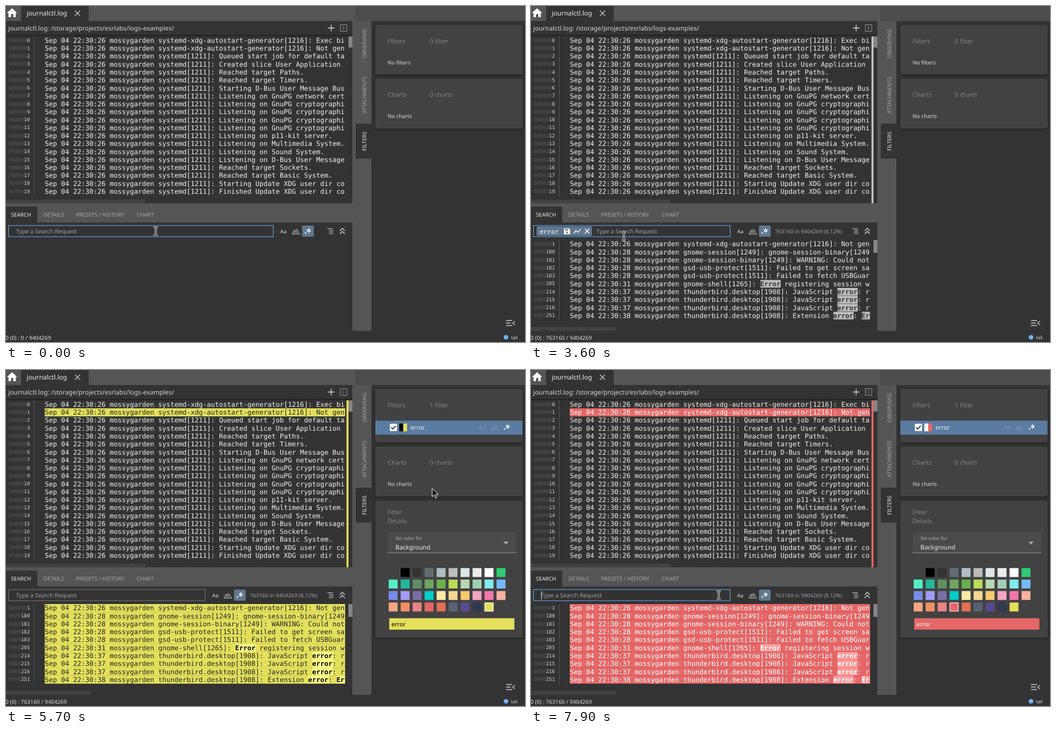
An HTML page for the animation above (8 s loop, 929 px wide and 603 px high).

```html
<!DOCTYPE html>
<html lang="en">
<head>
<meta charset="utf-8">
<title>Log search</title>
<style>
html, body { margin: 0; width: 100%; height: 100%; overflow: hidden; background: #333; }
svg { display: block; width: 929px; height: 603px; }
text { font-family: "Noto Sans", "Open Sans", sans-serif; white-space: pre; text-rendering: geometricPrecision; }
.mono { font-family: "DejaVu Sans Mono", monospace; }
.card { fill: #424242; filter: drop-shadow(0 1px 2px rgba(0, 0, 0, .45)); }
</style>
</head>
<body>
<svg viewBox="0 0 929 603"><g id="base"></g><g id="live"></g></svg>
<script>
const LOOP = 8000, STEP = 100;
const ROW = 14.27, CHAR = 7.26, LOG_X = 69.4, LOG_END = 607;
const GREY = '#555', BG = '#333', YELLOW = '#e4e05c', RED = '#e66767', STEEL = '#5f7890';

const rect = (x, y, w, h, fill, extra = '') =>
  `<rect x="${x}" y="${y}" width="${w}" height="${h}" fill="${fill}" ${extra}/>`;
const line = (d, color = '#ddd', width = 1.3) =>
  `<path d="${d}" fill="none" stroke="${color}" stroke-width="${width}"/>`;
const shape = (d, fill, extra = '') => `<path d="${d}" fill="${fill}" ${extra}/>`;
const text = (x, y, s, size, fill = '#ddd', extra = '') =>
  `<text x="${x}" y="${y}" font-size="${size}" fill="${fill}" ${extra}>${s}</text>`;
const mono = (x, y, s, size, fill) => text(x, y, s, size, fill, 'class="mono"');
const at = (x, y, s) => `<g transform="translate(${x} ${y})">${s}</g>`;

const HOST = 'mossygarden';
const mainLog = [
  'systemd-xdg-autostart-generator[1216]: Exec bi',
  'systemd-xdg-autostart-generator[1216]: Not gen',
  ...[
    'Queued start job for default ta', 'Created slice User Application ',
    'Reached target Paths.', 'Reached target Timers.',
    'Starting D-Bus User Message Bus', 'Listening on GnuPG network cert',
    'Listening on GnuPG cryptographi', 'Listening on GnuPG cryptographi',
    'Listening on GnuPG cryptographi', 'Listening on GnuPG cryptographi',
    'Listening on p11-kit server.', 'Listening on Multimedia System.',
    'Listening on Sound System.', 'Listening on D-Bus User Message',
    'Reached target Sockets.', 'Reached target Basic System.',
    'Starting Update XDG user dir co', 'Finished Update XDG user dir co'
  ].map(s => 'systemd[1211]: ' + s)
].map((s, i) => [i, 26, s]);

const jsError = 'thunderbird.desktop[1908]: JavaScript error: r';
const foundLog = [
  [1, 26, mainLog[1][2]],
  [180, 28, 'gnome-session[1249]: gnome-session-binary[1249'],
  [181, 28, 'gnome-session-binary[1249]: WARNING: Could not'],
  [182, 28, 'gsd-usb-protect[1511]: Failed to get screen sa'],
  [183, 28, 'gsd-usb-protect[1511]: Failed to fetch USBGuar'],
  [205, 31, 'gnome-shell[1265]: Error registering session w'],
  [214, 37, jsError], [215, 37, jsError], [216, 37, jsError],
  [251, 38, 'thunderbird.desktop[1908]: Extension error: Er']
];

const palette = `000 333 636e72 b2bec3 bdbdbd dfe6e9 ececec fff 2ecc71
 55efc4 22b898 5f8f63 6fa560 6ab04c badc58 b8d8b0 9fd0b5 81ecec 74b9ff
 778beb a29bfe 786fa6 00cec9 ffeaa7 f7d794 fdcb6e f8a5c2 f277a8 fab1a0
 f3a683 f19066 ea8685 e66767 e17055 596275 574b90 303952 e4e05c`.split(/\s+/);

// One log row: rank, optional row colour, matched words, text.
function logRow([rank, sec, msg], top, look, marked) {
  const n = String(rank);
  const full = `Sep 04 22:30:${sec} ${HOST} ${msg}`;
  let out = mono(5, top + 10, `<tspan fill="#575757">${'0'.repeat(7 - n.length)}</tspan>${n}`, 9, '#d4d4d4');
  if (look.row) out += rect(LOG_X, top, LOG_END - LOG_X, ROW + .2, look.row);
  let body = full;
  if (marked) {
    body = full.replace(/\berror|\bEr$/gi, (m, i) => {
      out += rect(LOG_X + i * CHAR, top + .3, m.length * CHAR, ROW - .6, look.mark);
      return `<tspan font-weight="700" fill="${look.markText}">${m}</tspan>`;
    });
  }
  return out + mono(LOG_X, top + 11.4, body, 12.06, look.row ? look.text : '#f2f2f2');
}

const PLAIN = { row: '', mark: '#bdbdbd', markText: '#333' };
const TINT = {
  [YELLOW]: { row: YELLOW, text: '#222', mark: '#fffd8a', markText: '#000' },
  [RED]: { row: RED, text: '#fff', mark: '#ff9a9a', markText: '#fff' }
};

const caseIcon = c => text(-6, 3.5, 'Aa', 9.3, c);
const wordIcon = c => text(-5.7, 3, 'ab', 9.3, c) + line('M-6.5 3V5.3H6.5V3', c, 1);
const regexIcon = c => rect(-5, 2.2, 2.3, 2.3, c) + line('M2-5V3M-1.5-3L5.5 1M5.5-3L-1.5 1', c, 1.4);

function drawBase() {
  let s = rect(0, 0, 929, 603, BG);
  s += rect(0, 0, 625, 27, GREY) + rect(625, 0, 304, 27, '#4d4d4d') + rect(27, 0, 121, 27, BG);
  s += shape('M1.5 12.5L11 4L20 12.5H17.5V20H13V14.5H9V20H4.5V12.5Z', '#fff');
  s += text(37, 17, 'journalctl.log', 11.7, '#eee') + line('M123.5 8.5L132.5 17.5M132.5 8.5L123.5 17.5', '#ccc');
  s += text(4, 43.5, 'journalctl.log: /storage/projects/esrlabs/logs-examples/', 11.42, '#d6d6d6');
  s += line('M576 39.5H588M582 33.5V45.5') + line('M598.5 33.5H610V45.5H598.5Z', '#999', 1) + line('M602.5 36.5L605.5 39.5L602.5 42.5', '#aaa', 1);
  s += rect(0, 52, 620, 2, '#222') + rect(50, 54, 1, 287, '#555');
  s += rect(613, 54.5, 7, 20, '#858585') + rect(0, 347.5, 249, 6.5, '#424242');
  s += rect(0, 354, 625, 34.5, GREY) + rect(0, 360, 56, 29, BG);
  s += text(9, 377.7, 'SEARCH', 9.65, '#eee') + text(67, 377.7, 'DETAILS', 9.65, '#aaa');
  s += text(125, 377.7, 'PRESETS / HISTORY', 9.65, '#aaa') + text(234, 377.7, 'CHART', 9.65, '#aaa');
  s += rect(620, 27, 34, 556, GREY) + rect(626, 211, 28, 63, BG);
  const side = (y, label, c) => `<g transform="translate(644.5 ${y}) rotate(-90)">${text(0, 0, label, 9.5, c)}</g>`;
  s += side(94, 'OBSERVING', '#aaa') + side(193, 'ATTACHMENTS', '#aaa') + side(260, 'FILTERS', '#eee');
  s += line('M575 399.5H585M578 402.5H586M578 405.5H586M578 408.5H586', '#ccc', 1.2);
  s += line('M597.5 403.5L602 399L606.5 403.5M597.5 409L602 404.5L606.5 409');
  s += line('M895 564.5H906M895 569H903.5M895 573.5H906M911 565.5L907 569L911 572.5', '#ccc', 1.4);
  s += '<circle cx="895" cy="594.5" r="4" fill="#6fb5f7"/>' + text(904, 597.8, 'tail', 8);
  return s;
}

// Pointer path: time, x, y.
const pointer = [
  [0, 268, 404], [2900, 268, 404], [3100, 202, 404], [3600, 166, 413], [3700, 166, 413],
  [4100, 136, 399], [4300, 136, 399], [4500, 64, 403], [4600, 64, 403], [4900, 353, 362],
  [5200, 741, 97], [5500, 745, 98], [6100, 797, 440], [6800, 758, 421], [7000, 758, 421],
  [7600, 336, 404], [8000, 336, 404]
];

function drawPointer(t) {
  const i = pointer.findIndex(p => p[0] > t);
  const [a, b] = [pointer[i - 1], pointer[i]];
  const k = (t - a[0]) / (b[0] - a[0]);
  const x = a[1] + (b[1] - a[1]) * k, y = a[2] + (b[2] - a[2]) * k;
  if (t < 4400 || t >= 7600) {
    const d = 'M-3.5-7Q0-7 0-5Q0-7 3.5-7M0-5V5M-3.5 7Q0 7 0 5Q0 7 3.5 7';
    return at(x, y, line(d, '#fff', 3) + line(d, '#111', 1.2));
  }
  return at(x, y, shape('M.5.5V15.5L4 12.2L6.5 18L9 16.8L6.5 11.2H11.5Z', '#111', 'stroke="#fff" stroke-width="1"'));
}

const typed = t => 'error'.slice(0, t < 1100 ? 0 : t < 1300 ? 1 : Math.min(5, Math.floor((t - 1300) / 100) + 2));

function drawSuggestions(word) {
  const hits = ['error', 'exec', 'kernel', 'fetch'].filter(s => s.includes(word));
  let s = rect(4, 415, 475, 5 + hits.length * 30, '#424242', 'rx="3" class="card"');
  hits.forEach((hit, i) => {
    s += text(18, 437 + i * 30, hit.replace(word, m => `<tspan font-weight="700">${m}</tspan>`), 10.15, '#fff');
  });
  return s;
}

function drawSearch(t, busy) {
  const chip = t >= 2300 && t < 4600;
  const right = t < 2300 ? 479 : busy ? 362 : 357;
  const focus = t < 5300 || t >= 7800;
  const word = t < 2300 ? typed(t) : '';
  const left = chip ? 117 : 18;
  let s = rect(4.5, 394, right - 5, 20, BG, `stroke="${focus ? '#6cb0f2' : '#7a7a7a'}"`);
  if (chip) {
    s += rect(10, 395.5, 99, 17, STEEL, 'rx="2"') + mono(15.5, 408.5, 'error', 11.3, '#fff');
    s += shape('M59 399H67.5L70 401.5V409.5H59Z', '#fff') + rect(60.5, 400.3, 6, 2.5, STEEL) + `<circle cx="64.5" cy="406.3" r="1.8" fill="${STEEL}"/>`;
    s += line('M76.5 408L80.5 403L84 406L89 400.5', '#fff', 1.5) + line('M96.5 400L104.5 408M104.5 400L96.5 408', '#fff', 1.5);
  }
  s += word ? text(18, 407.5, word, 10.1, '#e4e4e4')
            : text(left, 407.5, 'Type a Search Request', 10.3, '#a2a2a2');
  const caret = (t >= 300 && t < 2300) || (t >= 2800 && t < 3300) || (t >= 3800 && t < 4400) || t >= 7900;
  if (caret) s += rect(left + (word ? 4.9 * word.length : 0), 397, 1, 15, '#ddd');
  s += at(right + 18, 404, caseIcon('#ddd')) + at(right + 40, 404, wordIcon('#ddd'));
  s += rect(right + 51, 394, 21, 20, STEEL, 'rx="2"') + at(right + 61, 404, regexIcon('#fff'));
  if (t >= 2300) {
    s += text(right + 79.5, 408, busy ? '0 in 9404269 (0.00%)' : '763160 in 9404269 (8.12%)', 9.65, '#a0a0a0');
  }
  if (busy) {
    const turn = (t - 2900) * .3;
    s += `<g transform="translate(548.5 404) rotate(${turn})">${line('M5.5 5A7.4 7.4 0 1 1 6-4.4', '#aaa', 1.5)}</g>`;
  }
  if (t >= 1200 && t < 2300) s += drawSuggestions(word);
  return s;
}

function drawDetails(color) {
  let s = rect(661, 234.5, 264, 246, '', 'rx="4" class="card"');
  s += text(683, 258.7, 'Filter', 10.9, '#858585') + text(683, 274.7, 'Details', 10.9, '#858585');
  s += rect(683, 291, 231, 37, '#4a4a4a', 'rx="3"') + rect(683, 327.5, 231, 1, '#999');
  s += text(697, 305, 'Set color for', 8.4, '#b5b5b5') + text(697, 321.5, 'Background', 11, '#eee');
  s += shape('M890 308H900L895 313Z', '#aaa');
  palette.forEach((hex, i) => {
    const x = 685 + (i + 1) % 10 * 21.45, y = 355.5 + Math.floor((i + 1) / 10) * 20.6;
    s += rect(x, y, 16, 16, '#' + hex);
    if ('#' + hex === color) s += rect(x + .5, y + .5, 15, 15, 'none', 'stroke="#fff"');
  });
  return s;
}

function drawFilters(t, added, color) {
  const dy = added ? 7 : 0;
  const fore = color === RED ? '#fff' : '#000';
  const picked = t >= 5300;
  let s = rect(661, 34, 264, 89 + dy, '', 'rx="4" class="card"');
  s += text(683, 66.8, 'Filters', 11.1, '#858585') + text(758.5, 66.8, added ? '1 filter' : '0 filter', 10.9, '#858585');
  if (added) {
    if (picked) s += rect(661, 91, 263.5, 25, '#5a7ca0');
    s += rect(687, 96.5, 13, 13, '#fff', 'rx="1.5"') + line('M689.5 103L692.3 106L697.5 100', '#222', 1.6);
    s += rect(704, 96, 7, 14, fore) + rect(711, 96, 7, 14, color) + text(724, 107, 'error', 10.8, '#f2f2f2');
    const dim = picked ? '#8098b0' : '#888';
    s += at(853, 102.5, caseIcon(dim)) + at(874, 102.5, wordIcon(dim)) + at(896, 102.5, regexIcon('#fff'));
  } else {
    s += text(683, 104.5, 'No filters', 9.6);
  }
  s += rect(661, 130.5 + dy, 264, 89.5, '', 'rx="4" class="card"');
  s += text(683, 163.3 + dy, 'Charts', 11.1, '#858585') + text(758.5, 163.3 + dy, '0 charts', 10.9, '#858585');
  s += text(683, 201 + dy, 'No charts', 9.6);
  if (t >= 5200) {
    s += drawDetails(color);
    // Ring on the swatch under the pointer.
    if (t >= 6600 && t < 7000) s += rect(749.9, 417.8, 15, 15, 'none', 'stroke="#fff"');
    s += rect(686, 445.5, 224, 20.5, color) + text(690, 459.5, 'error', 10.6, fore);
  }
  return s;
}

function drawLive(t) {
  const added = t >= 4800;
  const busy = (t >= 2300 && t < 3000) || (t >= 4600 && t < 4800);
  const found = t >= 3000 && !busy;
  const color = t >= 7000 ? RED : YELLOW;
  const look = added ? TINT[color] : PLAIN;
  let s = mainLog.map((r, i) => logRow(r, 54.5 + i * ROW, i === 1 ? look : PLAIN, false)).join('');
  if (found) {
    s += rect(609.5, 54.5, 3.5, 299.5, added ? color : '#c4c4c4');
    s += foundLog.map((r, i) => logRow(r, 420 + i * ROW, look, true)).join('');
    s += rect(50, 420, 1, 143, '#555') + rect(613, 420, 7, 23, '#858585');
  }
  if (t >= 3200) s += rect(0, 576, 152, 7, '#424242');
  s += drawSearch(t, busy) + drawFilters(t, added, color);
  s += text(-1, 598.8, `0 (0) : ${found ? 763160 : 0} / 9404269`, 9.9);
  return s + drawPointer(t);
}

document.getElementById('base').innerHTML = drawBase();
const live = document.getElementById('live');
const start = performance.now();
let shown = -1;

function tick() {
  const t = Math.floor((performance.now() - start) % LOOP / STEP) * STEP;
  if (t !== shown) live.innerHTML = drawLive(shown = t);
  requestAnimationFrame(tick);
}
tick();
</script>
</body>
</html>
```
